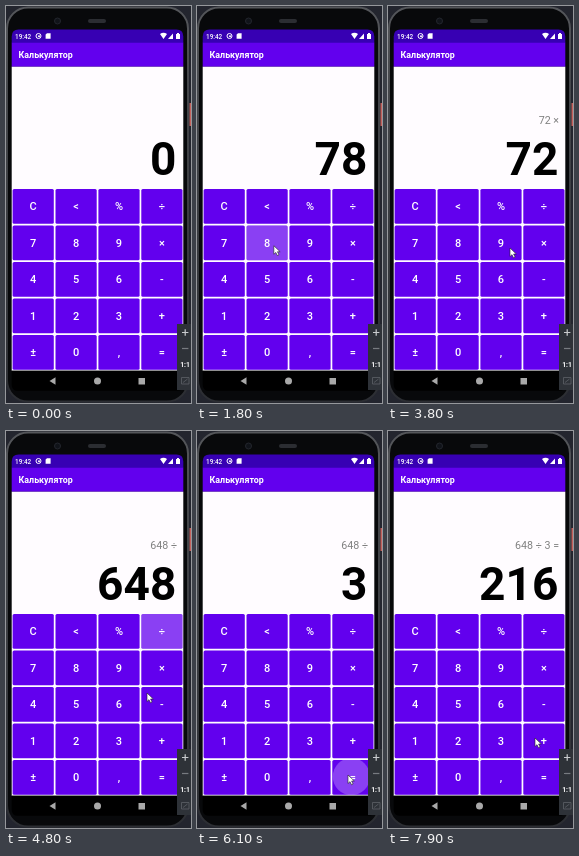
An HTML page that plays this animation: 185 by 397 pixels, repeating every 8 s.

```html
<!DOCTYPE html>
<html lang="ru">
<head>
<meta charset="utf-8">
<title>Калькулятор</title>
<style>
  html, body { margin: 0; width: 100%; height: 100%; overflow: hidden; background: #23252e; }
  svg { display: block; width: 100vw; height: 100vh; font-family: Roboto, sans-serif; }
  .key { fill: #6200ee; }
  .label { fill: #fff; font-size: 11px; font-weight: 500; text-anchor: middle; }
  .ripple { fill: #fff; fill-opacity: .25; }
  .result { font-size: 46px; font-weight: 700; text-anchor: end; }
  .expression { font-size: 10.7px; fill: #808080; text-anchor: end; }
</style>
</head>
<body>
<svg viewBox="0 0 185 397">
  <defs>
    <linearGradient id="rim" x2="0" y2="1">
      <stop stop-color="#55575b"/>
      <stop offset=".2" stop-color="#45474b"/>
      <stop offset="1" stop-color="#2c2e33"/>
    </linearGradient>
  </defs>

  <!-- Phone body -->
  <path d="M183.5 97h1.5v23h-1.5z" fill="#c4615c"/>
  <rect x="1" y="1.5" width="181" height="394" rx="21" fill="#08090b" stroke="url(#rim)" stroke-width="2"/>
  <rect x="82" y="13" width="18" height="4" rx="2" fill="#2b2d32"/>
  <circle cx="51.5" cy="15" r="3" fill="#101319" stroke="#23262d"/>

  <!-- Screen -->
  <path d="M5.7 37V30.5q0-7 7-7h157.6q7 0 7 7V37z" fill="#3700b3"/>
  <path d="M5.7 36.7h171.6v24H5.7z" fill="#6200ee"/>
  <path d="M5.7 60.7h171.6v304H5.7z" fill="#fffcff"/>
  <path d="M5.7 364.7h171.6v14q0 6-6 6H11.7q-6 0-6-6z" fill="#000"/>

  <g fill="#fff">
    <text x="9" y="32.6" font-size="6.4" font-weight="500">19:42</text>
    <circle cx="32.5" cy="30" r="2.5" fill="none" stroke="#fff"/>
    <circle cx="33" cy="30.3" r="1"/>
    <path d="M41 27.2h3.6v5.6h-5v-4.2z"/>
    <path d="M154 28q3.5-2.5 7 0l-3.5 5zM162 33l5-5.5V33zM170 28h1v-1h2v1h1v5h-4z"/>
    <text x="12.6" y="52" font-size="8.9" font-weight="700">Калькулятор</text>
  </g>
  <text class="expression" id="expression" x="171" y="118"></text>
  <text class="result" id="result" x="170.3" y="169.4"></text>
  <g id="keys"></g>

  <g fill="#a9a9a9">
    <path d="M43.5 375l6-3.7v7.4z"/>
    <circle cx="91.5" cy="375" r="3.5"/>
    <path d="M132.5 372h6.5v6.5h-6.5z"/>
  </g>

  <!-- Side toolbar -->
  <path d="M171 318h14v66h-14z" fill="#2e3238"/>
  <g fill="none" stroke="#c9cbce" stroke-width="1.2">
    <path d="M176 326.5h6.4M179.2 323.3v6.4"/>
    <path d="M176 342.5h6.4" stroke="#777b80"/>
    <path d="M175.5 371.5h7.5v6.5h-7.5zM177 376.5l4.5-3.5" stroke="#5d6167" stroke-width=".8"/>
  </g>
  <text x="179" y="361.3" font-size="6.8" font-weight="700" fill="#fff" text-anchor="middle">1:1</text>

  <path id="cursor" d="M0 0v8.5l2-1.8 1.5 3.1 1.6-.8-1.5-3h2.7z" fill="#fff" stroke="#222" stroke-width=".6"/>
</svg>
<script>
const LOOP = 8000, STEP = 100;
const RELEASE = 200, SPREAD = 225, FADE_START = 300, FADE_TIME = 200;
const KEY_W = 41.2, KEY_H = 34.7;
const LABELS = [...'C<%÷789×456-123+±0,='];

// Press time, key, then the result and expression after release.
const presses = [
  [1000, '7', '7', ''],
  [1500, '8', '78', ''],
  [2300, '-', '78', '78 -'],
  [2850, '6', '6', '78 -'],
  [3250, '×', '72', '72 ×'],
  [3900, '9', '9', '72 ×'],
  [4500, '÷', '648', '648 ÷'],
  [5400, '3', '3', '648 ÷'],
  [6000, '=', '216', '648 ÷ 3 =']
];

// Cursor stops: time, x, y.
const stops = [
  [200, 168, 338], [800, 45, 234], [1150, 45, 234], [1500, 68, 236], [1700, 68, 236],
  [2200, 153, 272], [2450, 153, 272], [2700, 122, 276], [2950, 122, 276],
  [3200, 152, 236], [3450, 152, 236], [3800, 122, 242], [4050, 122, 242],
  [4450, 154, 203], [4680, 154, 203], [4800, 141, 262], [5100, 114, 308],
  [5550, 114, 308], [5900, 151, 344], [7100, 151, 344], [7700, 147, 307]
];

const byId = id => document.getElementById(id);
const clamp = v => Math.max(0, Math.min(1, v));
const mix = (a, b, p) => a + (b - a) * p;

function add(parent, tag, attrs, text = '') {
  const node = document.createElementNS('http://www.w3.org/2000/svg', tag);
  for (const name in attrs) node.setAttribute(name, attrs[name]);
  node.textContent = text;
  return parent.appendChild(node);
}

const keys = {};
LABELS.forEach((label, i) => {
  const x = 27.2 + 42.9 * (i % 4), y = 200.3 + 36.5 * Math.floor(i / 4);
  const box = { x: x - KEY_W / 2, y: y - KEY_H / 2, width: KEY_W, height: KEY_H, rx: 1.5 };
  const group = byId('keys');
  add(add(group, 'clipPath', { id: 'clip' + i }), 'rect', box);
  add(group, 'rect', { ...box, class: 'key' });
  const ripple = add(group, 'circle', { class: 'ripple', 'clip-path': `url(#clip${i})` });
  add(group, 'text', { x, y: y + 4, class: 'label' }, label);
  keys[label] = { x, y, ripple };
});

function cursorAt(time) {
  const next = stops.findIndex(stop => stop[0] > time);
  if (next < 0) return stops.at(-1).slice(1);
  if (next === 0) return stops[0].slice(1);
  const [t0, x0, y0] = stops[next - 1], [t1, x1, y1] = stops[next];
  const p = (time - t0) / (t1 - t0), eased = p * p * (3 - 2 * p);
  return [mix(x0, x1, eased), mix(y0, y1, eased)];
}

function drawRipple(time, start, { x, y, ripple }) {
  const age = time - start;
  const spread = 1 - (1 - clamp(age / SPREAD)) ** 2;
  const [touchX, touchY] = cursorAt(start);
  ripple.setAttribute('cx', mix(touchX, x, spread));
  ripple.setAttribute('cy', mix(touchY, y, spread));
  ripple.setAttribute('r', Math.hypot(KEY_W, KEY_H) / 2 * spread);
  ripple.setAttribute('opacity', age < 0 ? 0 : 1 - clamp((age - FADE_START) / FADE_TIME));
}

function draw(now) {
  const time = Math.floor(now % LOOP / STEP) * STEP;
  let result = '0', expression = '';
  for (const [start, label, nextResult, nextExpression] of presses) {
    drawRipple(time, start, keys[label]);
    if (time >= start + RELEASE) [result, expression] = [nextResult, nextExpression];
  }
  byId('result').textContent = result;
  byId('expression').textContent = expression;
  const cursor = byId('cursor');
  cursor.setAttribute('transform', `translate(${cursorAt(time)})`);
  cursor.setAttribute('visibility', time < stops[0][0] ? 'hidden' : 'visible');
}

const began = performance.now();
function tick() {
  draw(performance.now() - began);
  requestAnimationFrame(tick);
}
tick();
</script>
</body>
</html>
```
